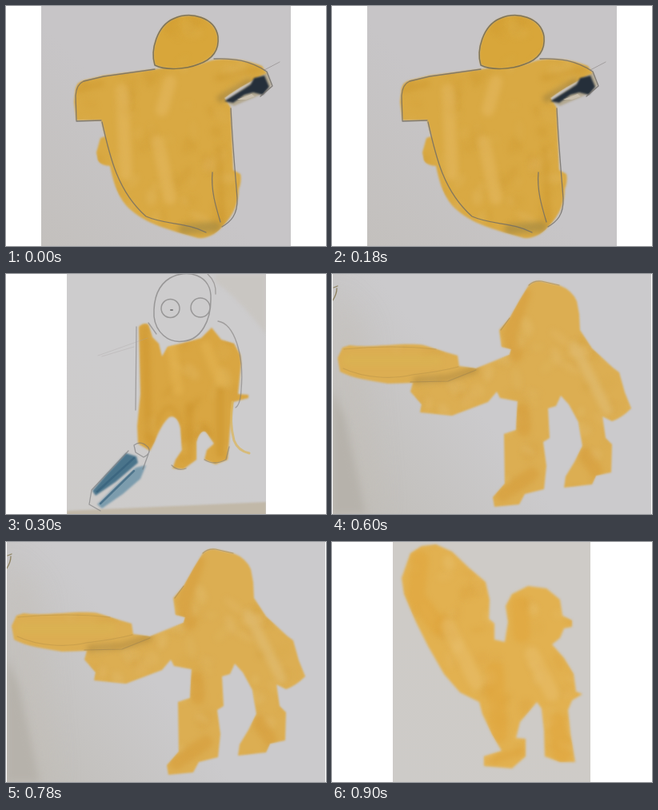
An HTML page with a canvas for the animation above (1200 ms loop, 400x300 px).

```html
<!DOCTYPE html>
<html lang="en">
<meta charset="utf-8">
<title>Painted figure</title>
<style>
  html, body { margin: 0; width: 100%; height: 100%; overflow: hidden; background: #fff }
  canvas { display: block }
</style>
<canvas width="400" height="300"></canvas>
<script>
const ctx = document.querySelector('canvas').getContext('2d');

function seeded(seed) {
  return () => (seed = (seed * 16807) % 2147483647) / 2147483647;
}

function fill(d, color, blur = 0.7) {
  ctx.filter = `blur(${blur}px)`;
  ctx.fillStyle = color;
  ctx.fill(new Path2D(d));
  ctx.filter = 'none';
}

function pencil(d, color = '#706c66cc', width = 1.3) {
  ctx.filter = 'blur(0.5px)';
  ctx.strokeStyle = color;
  ctx.lineWidth = width;
  ctx.lineJoin = ctx.lineCap = 'round';
  ctx.stroke(new Path2D(d));
  ctx.filter = 'none';
}

// Sheet shaded from its lower left to its upper right; later paint stays on it.
function paper(x, w, near, far) {
  const shade = ctx.createLinearGradient(x, 300, x + w, 0);
  shade.addColorStop(0, near);
  shade.addColorStop(0.45, far);
  ctx.beginPath();
  ctx.rect(x, 0, w, 300);
  ctx.clip();
  ctx.fillStyle = shade;
  ctx.fill();
}

// Watercolour: a flat soft shape with broad strokes and random blotches inside.
function wash(d, color, dark, light, seed, blur = 0.9, strokes = []) {
  fill(d, color, blur);
  const rnd = seeded(seed);
  ctx.save();
  ctx.clip(new Path2D(d));
  ctx.filter = 'blur(3px)';
  for (let i = 0; i < 160; i++) {
    ctx.globalAlpha = 0.1 + rnd() * 0.25;
    ctx.fillStyle = i % 2 ? dark : light;
    ctx.beginPath();
    ctx.ellipse(rnd() * 400, rnd() * 300, 4 + rnd() * 11, 3 + rnd() * 6, rnd() * 3, 0, 7);
    ctx.fill();
  }
  ctx.globalAlpha = 0.45;
  ctx.lineCap = 'round';
  for (const [path, width, tone] of strokes) {
    ctx.strokeStyle = tone || dark;
    ctx.lineWidth = width;
    ctx.stroke(new Path2D(path));
  }
  ctx.restore();
}

function coat() {
  paper(44, 312, '#c3c0bd', '#c7c5c7');
  const head = 'M186 74C180 55 189 25 209 16C231 6 261 14 265 38C267 58 255 68 240 73C225 79 200 81 186 74Z';
  fill('M273 120L326 82L332 99L320 110L285 125Z', '#b3a992', 1);
  wash('M87 103Q89 95 97 93L122 87L186 79C210 76 235 76 250 70C265 63 300 66 320 75L326 84C310 92 290 102 273 115L281 127C282 150 283 180 284 205L293 210Q295 218 291 229C291 244 285 262 270 276C262 286 250 291 240 290L215 283C190 275 168 268 150 249C138 235 133 215 130 200Q118 199 115 193L113 183L118 165L124 163L119 143L88 143L85 120Z',
    '#d9a943', '#cd982e', '#e2b964', 71, 0.9, [
      ['M145 105L150 210M190 170L205 240M205 95L195 130', 16, '#e6bd68'],
      ['M266 180L270 270M90 105L118 97M265 90L315 80', 9],
      ['M268 116L304 95', 9, '#8b7138'],
      ['M222 279L262 276', 13, '#8d7c45']
    ]);
  wash(head, '#d8a63a', '#cc962b', '#dfb250', 29);
  fill('M273 119L297 104L306 98L310 90L323 87L329 101L321 111L309 108L298 111L284 121Z', '#252f3a', 0.9);
  fill('M289 117L307 110L311 113L300 117Z', '#c9bfae');
  pencil(head, '#696450cc', 1.5);
  pencil('M88 143L87 112Q88 98 97 94L122 88L186 79M88 144L119 143M120 145C130 190 140 232 175 263C200 274 225 270 250 283');
  pencil('M281 128C283 170 287 215 289 240C290 262 280 270 270 276M258 208C256 230 262 250 268 270M260 66C285 65 305 68 326 82L333 100L318 113');
  pencil('M323 80L342 70', '#89848299', 1);
}

function walker() {
  paper(76, 249, '#cdcbc9', '#cdcccd');
  fill('M262 0H325V75Q292 32 262 10Z', '#c9c6c2', 2);
  fill('M76 296L325 285V310H76Z', '#c1b8a8', 1);
  wash('M166 66Q172 60 178 63L183 79L191 87L195 103L202 91L222 86L244 80L257 67L269 82L285 87L293 101L294 112L290 150L303 151L303 155L284 160L280 195L277 232L262 238L248 232L251 220L260 212L252 200C247 192 241 199 238 210L238 232L222 244L208 243L212 232L220 220L218 193C216 181 210 176 204 179C197 185 191 196 186 209L180 221L165 212L164 190L168 150Z',
    '#d9a642', '#cb9029', '#e3bb66', 113, 1.1, [
      ['M174 70L178 205M229 165L230 228M268 145L268 225', 10],
      ['M188 190Q203 145 218 185M239 205Q248 180 253 205', 5],
      ['M207 92L215 145M250 90L268 135', 13, '#e7b957']
    ]);
  pencil('M283 160Q279 185 285 208Q290 221 304 224', '#dab65cbb', 3);
  pencil('M205 5C225 -7 258 0 256 32C256 58 244 82 222 84C202 87 187 72 185 53C184 30 190 14 205 5ZM217 43A11.5 11.5 0 1 1 194 43A11.5 11.5 0 1 1 217 43M255 42A12 12 0 1 1 231 42A12 12 0 1 1 255 42', '#75737499', 1.5);
  pencil('M206 45H208', '#555a', 2);
  pencil('M252 0Q263 10 262 25M265 59C285 62 298 100 294 145Q293 163 287 167M163 66L162 170M178 61L188 75', '#78757388');
  pencil('M115 102L177 80M120 103L160 91', '#aaa6a455', 1);
  pencil('M207 239Q215 247 225 243M248 232Q260 240 275 232L279 216', '#86807699');
  fill('M150 224L163 228L165 236L137 260L112 277L108 271L125 251Z', '#4a748b', 1);
  fill('M162 242L175 239L168 256L146 275L120 293L114 288L138 264Z', '#7c9cad', 1);
  pencil('M160 230L114 272M160 246L118 287', '#36617baa', 2.5);
  pencil('M160 214Q169 207 178 217Q182 224 172 229L162 223ZM153 221L107 270L104 288L118 296M178 225L171 244', '#77777999');
}

function pointer() {
  paper(1, 398, '#bfbcb6', '#cbcacc');
  fill('M0 20L40 60L60 300H0Z', '#c3bfb766', 16);
  fill('M0 145L16 180L28 235L42 300H0Z', '#b6b2ab', 5);
  wash('M13 92L22 89C50 93 90 85 115 89L140 97L157 102L159 115L180 118L222 101L224 94L212 91L209 70L222 55L235 32L246 14Q252 8 262 9L284 14Q300 20 306 34L309 50L310 70L325 93L351 117L359 123L366 148L374 168Q362 180 350 184L338 178L342 205L350 213L349 248L330 252L325 263L290 267L292 253L303 235L313 215L308 185L296 163L286 152L280 165L270 168L272 205L264 210L268 240L265 269L241 275L234 288L203 291L201 279L216 262L215 200L230 195L232 159L210 155L206 147L195 160L150 177L110 173L112 163L98 147L101 136L70 137C45 133 25 130 10 122L7 105Z',
    '#dcae52', '#d5a140', '#e3c074', 47, 1, [
      ['M240 25L222 76L230 102M238 170L240 195M316 225L330 246M213 276L250 250', 17, '#d59a36'],
      ['M303 90L344 170', 13, '#e3c480'],
      ['M20 108L130 108', 14, '#d9b552'],
      ['M105 133L145 130L178 120', 9, '#a4803d']
    ]);
  pencil('M14 118C40 130 75 132 100 126Q135 122 158 116M15 94Q75 88 130 94', '#b9944988', 1.2);
  pencil('M98 135L145 134L180 120M246 14Q252 8 262 9L284 14M222 55L211 70', '#9c824f88', 1.2);
  pencil('M1 33Q6 25 6 18M2 17L7 15', '#8d815f');
}

function bird() {
  paper(76, 247, '#cdcbc8', '#cecbc7');
  wash('M98 14L112 5L130 3L150 12L172 33L192 50L197 72L196 96L203 102L203 122L216 125L220 100L217 80L225 65L245 55L268 58L285 72L288 92L300 98L300 106L290 108L285 120L275 128L290 145L302 165L305 187L313 190L300 198L295 210L298 240L304 275L285 275L266 268L265 235L262 208L256 200L235 225L230 245L242 246L242 268L225 283L190 280L190 268L212 261L200 240L188 215L184 200L160 188L140 165L120 130L105 100L90 65L87 45Z',
    '#e2b150', '#db9f39', '#e9c478', 83, 1.8, [
      ['M110 22L105 68L132 105M235 78L237 115M204 160L208 240M282 225L287 265', 22, '#dfa236'],
      ['M145 105L180 175M250 140L275 190', 18, '#e9c272'],
      ['M198 273L235 262', 10]
    ]);
}

const poses = [coat, walker, pointer, bird];
let shown = -1;

function tick(now) {
  const pose = Math.floor(now / 300) % poses.length;
  if (pose !== shown) {
    shown = pose;
    ctx.fillStyle = '#fff';
    ctx.fillRect(0, 0, 400, 300);
    ctx.save();
    poses[pose]();
    ctx.restore();
  }
  requestAnimationFrame(tick);
}
tick(performance.now());
</script>
</html>
```
